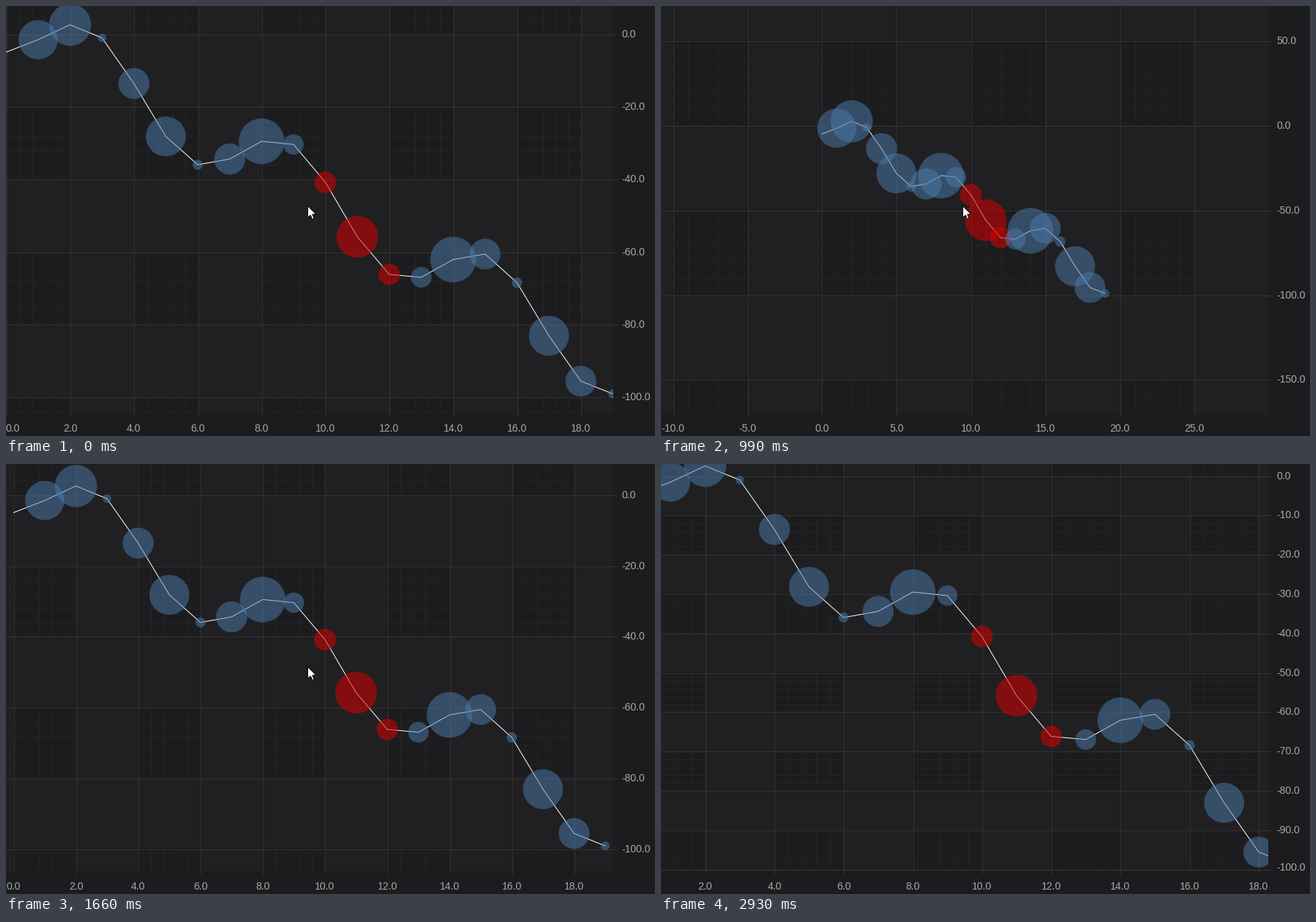
Write a matplotlib script that moves like this. It is 887x588 px and loops after 3210 ms.

```python
import numpy as np
import matplotlib.pyplot as plt
from matplotlib.animation import FuncAnimation
from matplotlib.collections import LineCollection, PolyCollection
from matplotlib.patches import Polygon, Rectangle

W, H, DPI = 887, 588, 64
PANEL_W, PANEL_H = 830, 557
LOOP, TICK = 3210, 10
PX = 72 / DPI
ASPECT = 8.79           # x pixels per unit / y pixels per unit
MAX_TICKS = 10.8
FONT_PX = 14

# Wheel clicks at each time: positive zooms out, negative zooms in
WHEEL = {690: 3, 840: 3, 990: 2, 1420: -3, 1540: -2, 1660: -2, 1810: -1}
# The picture only refreshes at these times
REFRESH = [0, *WHEEL, 2120, 2240, 2360, 2510, 2660, 2810, 2930]
# Pointer path: ms, x, y
PATH = np.array([(990, 412, 273), (1540, 412, 274), (1660, 412, 277),
                 (2000, 412, 277), (2360, 690, 495), (2510, 814, 541),
                 (2660, 838, 567), (2930, 854, 589)])
START_SCALE, START_ORIGIN = 43.63, np.array([0.3, 38.2])

ARROW = np.array([(0.5, 0.5), (0.5, 16.3), (4.2, 12.9), (6.7, 18.5),
                  (9.1, 17.5), (6.7, 12.0), (11.6, 11.6)])

n = np.arange(20)
values = np.cumsum(10 * np.sin(n) - 5)
diameters = np.abs(60 * np.sin(n) + 3)
BLUE, RED = (0.30, 0.485, 0.68, 0.5), (0.843, 0, 0, 0.55)
colors = [RED if 10 <= i <= 12 else BLUE for i in n]


def pointer_at(ms):
    ms = max(t for t in REFRESH if t <= ms)
    t, x, y = PATH.T
    return np.round([np.interp(ms, t, x), np.interp(ms, t, y)])


def view_at(ms):
    """Zoom about the pointer, 10 % of the visible range per wheel click."""
    scale, origin = START_SCALE, START_ORIGIN
    for t, clicks in WHEEL.items():
        if t <= ms:
            ratio = (1 + 0.1 * np.sign(clicks)) ** -abs(clicks)
            focus = pointer_at(t)
            scale, origin = scale * ratio, focus + (origin - focus) * ratio
    return scale, *origin


def nice_step(span):
    steps = (m * 10.0 ** e for e in range(-1, 4) for m in (1, 2, 5))
    return next(s for s in steps if span / s <= MAX_TICKS)


def snap(p):
    return np.floor(p) + 0.5


def text_width(text):
    em = sum({".": 0.278, "-": 0.333}.get(c, 0.556) for c in text)
    return em * FONT_PX


def tick_range(lo, hi, step):
    return np.arange(np.floor(lo / step), np.ceil(hi / step) + 1)


def vlines(xs, bottom):
    return [[(x, 0), (x, bottom)] for x in xs]


def hlines(ys, right):
    return [[(0, y), (right, y)] for y in ys]


def box(x0, y0, x1, y1):
    return [(x0, y0), (x1, y0), (x1, y1), (x0, y1)]


fig = plt.figure(figsize=(W / DPI, H / DPI), dpi=DPI, facecolor="#1c1c1e")
ax = fig.add_axes([0, 0, 1, 1])
ax.axis("off")

panel = Rectangle((0, 0), PANEL_W, PANEL_H, transform=ax.transData)
minor = LineCollection([], colors="#232426", linewidths=PX, zorder=1)
bands = PolyCollection([], facecolors="#202022", linewidths=0,
                       antialiaseds=False, zorder=2)
major = LineCollection([], colors="#323234", linewidths=PX, zorder=3)
for c in (minor, bands, major):
    ax.add_collection(c, autolim=False)

line, = ax.plot([], [], color="white", lw=PX, zorder=4)
bubbles = ax.scatter(n[1:], values[1:], s=(diameters[1:] * PX) ** 2,
                     c=colors[1:], linewidths=0, zorder=5)
for artist in (minor, bands, line, bubbles):
    artist.set_clip_path(panel)

labels = [ax.text(0, 0, "", family="Liberation Sans", size=FONT_PX * PX,
                  color="#a8a8a8", va="baseline", zorder=6)
          for _ in range(30)]
pointer = Polygon(ARROW, closed=True, fc="white", ec="black", lw=0.9 * PX,
                  zorder=9)
ax.add_patch(pointer)
ax.set_xlim(0, W)
ax.set_ylim(H, 0)


def layout_axis(to_px, lo, hi, length):
    """Return tick values, their pixels, minor pixels and light bands."""
    step = nice_step(hi - lo)
    k = tick_range(lo, hi, step)
    px = to_px(k * step)
    keep = (px >= 0) & (px < length)
    small = to_px(tick_range(lo, hi, step / 5) * step / 5)
    stripes = [np.floor(to_px(np.array([i, i + 1]) * step))
               for i in np.append(k[0] - 1, k) if i % 2]
    return (k * step)[keep], px[keep], small, stripes


def show_view(sx, x0, y0):
    sy = sx / ASPECT

    def to_x(v):
        return x0 + sx * v

    def to_y(v):
        return y0 - sy * v

    xv, xp, xs, xb = layout_axis(to_x, -x0 / sx, (PANEL_W - x0) / sx, PANEL_W)
    yv, yp, ys, yb = layout_axis(to_y, (y0 - PANEL_H) / sy, y0 / sy, PANEL_H)

    minor.set_segments(vlines(snap(xs), PANEL_H) + hlines(snap(ys), PANEL_W))
    bands.set_verts([box(a, 0, b, PANEL_H) for a, b in xb]
                    + [box(0, a, PANEL_W, b) for a, b in yb])
    major.set_segments(vlines(snap(xp), PANEL_H + 4)
                       + hlines(snap(yp), PANEL_W + 5))

    line.set_data(to_x(n), to_y(values))
    bubbles.set_offsets(np.column_stack([to_x(n[1:]), to_y(values[1:])]))

    items = []
    for v, p in zip(xv, xp):
        text = f"{v + 0.0:.1f}"
        w = text_width(text)
        items.append((np.clip(p - w / 2, 0, PANEL_W - w), 582, text))
    for v, p in zip(yv, yp):
        items.append((841, min(np.floor(p), 551) + 5, f"{v + 0.0:.1f}"))
    for i, label in enumerate(labels):
        label.set_visible(i < len(items))
        if i < len(items):
            x, y, text = items[i]
            label.set_position((x, y))
            label.set_text(text)


def update(i):
    ms = i * TICK
    show_view(*view_at(ms))
    pointer.set_xy(ARROW + pointer_at(ms))
    return minor, bands, major, line, bubbles, pointer, *labels


anim = FuncAnimation(fig, update, frames=LOOP // TICK, interval=TICK,
                     repeat=True, repeat_delay=0, cache_frame_data=False)
plt.show()
```
